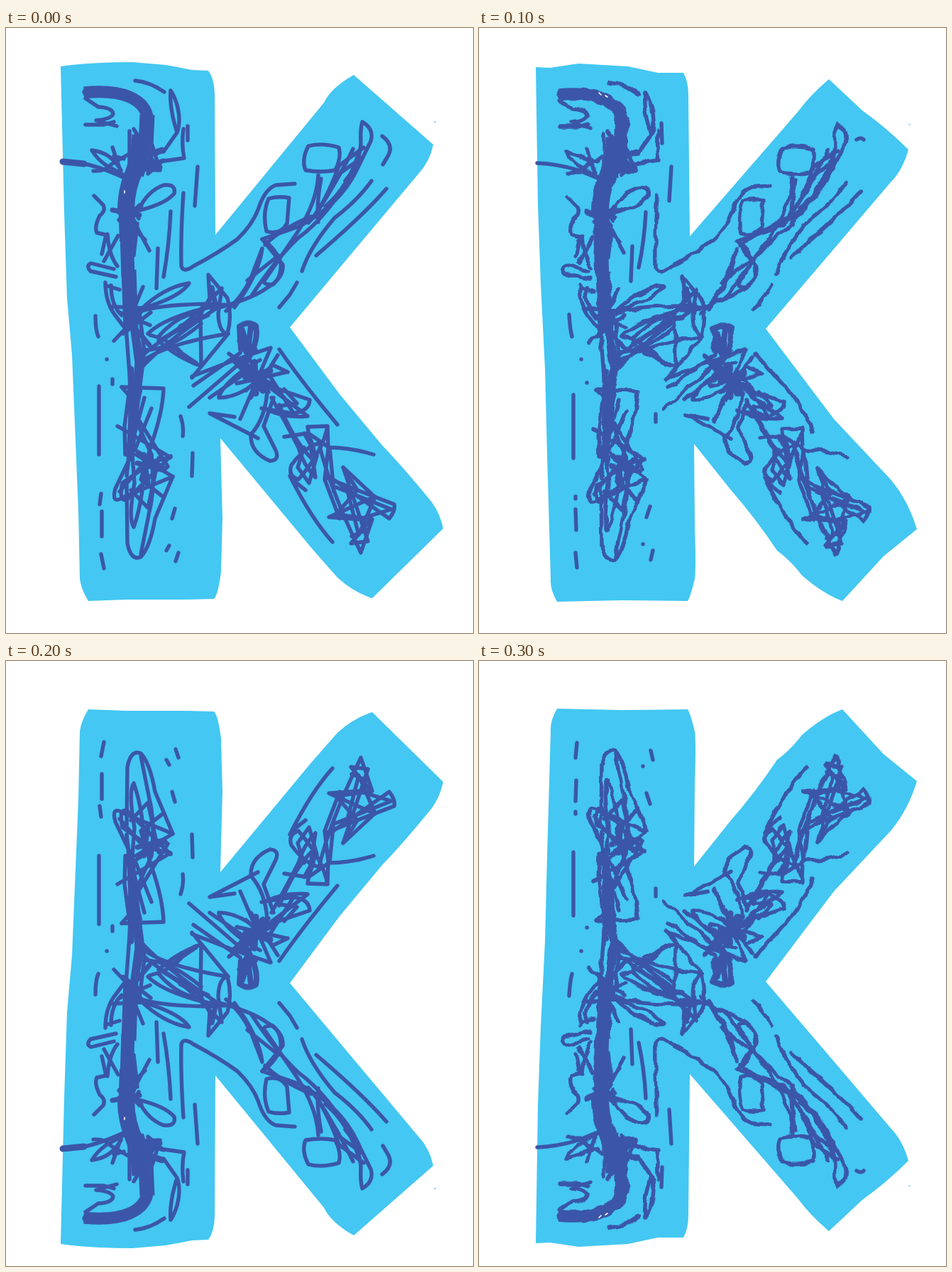
An HTML page without scripts for the animation above (0.4 s loop, 658 by 851 pixels).

```html
<!DOCTYPE html>
<html lang="en">
<head>
<meta charset="utf-8">
<title>Scribbled K</title>
<style>
  html, body { margin: 0; width: 100%; height: 100%; overflow: hidden; background: #fff; }
  svg { display: block; width: 658px; height: 851px; animation: flip 400ms step-end infinite; }
  .body { fill: #44c7f2; }
  .ink { fill: none; stroke: #3b56a8; stroke-width: 5.4; stroke-linecap: round; stroke-linejoin: round; }
  .smooth { animation: blink 200ms step-end infinite; }
  .rough { visibility: hidden; animation: blink 200ms step-end -100ms infinite; }
  .speck { stroke: #fff; stroke-width: 1.6; }
  /* the letter turns upside down every second pose */
  @keyframes flip { 50% { transform: translateY(23px) scaleY(-1); } }
  @keyframes blink { 0% { visibility: visible; } 50%, 100% { visibility: hidden; } }
</style>
</head>
<body>
<svg viewBox="0 0 658 851">
  <defs>
    <filter id="wobble" filterUnits="userSpaceOnUse" x="0" y="0" width="658" height="851" color-interpolation-filters="sRGB">
      <feTurbulence type="fractalNoise" baseFrequency=".07" numOctaves="1" seed="4"/>
      <feDisplacementMap in="SourceGraphic" scale="8" xChannelSelector="R" yChannelSelector="G"/>
    </filter>

    <g id="scribble">
      <!-- hook and trunk -->
      <g stroke-linecap="butt">
        <path stroke-width="17" d="M110 91Q150 87 174 97Q198 107 200 130L199 162"/>
        <path stroke-width="21" d="M199 122L197 165"/>
        <path stroke-width="27" d="M191 150Q190 180 181 205"/>
        <path stroke-width="24" d="M184 195Q168 225 169 262"/>
        <path stroke-width="22" d="M169 240L171 300"/>
        <path stroke-width="19" d="M170 290L172 350"/>
        <path stroke-width="21" d="M173 340L176 425"/>
      </g>
      <path d="M113 85L110 90L114 98M174 145V200M180 142L215 200L180 198L222 186L200 205L206 165L217 200"/>
      <path stroke-width="9" d="M186 185L216 196M196 180L220 172M178 200L205 192"/>
      <path d="M176 410L184 470L182 520L170 630M188 400L195 455L186 525L178 600M169 420L175 500L167 560L168 600M163 505L176 520L172 615"/>
      <path stroke-width="9" d="M182 425L188 455L184 510M176 480L177 560"/>

      <!-- top of the stem -->
      <path d="M112 99L130 111Q150 112 151 121Q148 128 127 130L156 138M112 136H138L152 132"/>
      <path d="M182 74Q203 76 223 90"/>
      <path d="M232 88Q230 112 241 147Q247 132 241 108Q237 95 232 88M241 147L222 174M250 142Q247 163 251 183L216 188"/>
      <path d="M121 172Q128 184 141 193L168 208M121 172Q148 175 162 200M150 168L162 203M123 201Q140 202 148 192L172 178M152 180L166 184"/>
      <path d="M184 262Q197 230 222 221Q240 219 237 233Q223 249 181 258L187 268"/>
      <path stroke-width="7" d="M150 256L188 263M160 270L190 250M172 275L188 250"/>

      <!-- left twigs -->
      <path d="M124 236L137 249Q141 257 132 264Q124 280 128 288L141 291L135 318M143 290Q145 320 157 335M138 328L158 292"/>
      <path d="M155 350L119 342Q112 334 120 331L152 339M140 358Q140 385 153 403L166 420M148 362Q148 390 163 404M140 362L160 368"/>
      <path d="M178 265L187 285L202 313M178 280L196 298M185 275L180 320"/>
      <path d="M150 392L196 394M152 440L190 400M165 430L204 400M193 364L170 420M160 400L203 418"/>

      <!-- knot between stem and arms -->
      <path d="M190 396Q222 365 258 359Q247 377 200 392L176 402M180 402Q210 388 300 388M200 430Q225 405 300 390"/>
      <path d="M215 434Q245 400 275 401L287 380L285 347L312 380Q319 405 312 430Q300 428 299 402L304 366L268 402"/>
      <path d="M186 466Q225 430 285 404M188 472Q220 445 313 430M196 453Q232 452 275 416M182 488Q215 447 300 392"/>
      <path d="M203 432Q235 440 250 460Q262 474 275 474L274 404M232 447L268 471M222 436Q250 420 266 403M215 440Q240 462 262 470M262 492L313 430"/>
      <path stroke-width="7" d="M246 420L276 405M278 392L308 390M290 365L296 392M180 420L202 446"/>

      <!-- upper arm -->
      <path d="M247 335Q250 345 264 335Q300 316 326 297Q350 274 357 250Q366 226 380 221L407 219M250 232Q246 290 247 335"/>
      <path d="M290 396Q345 382 367 366Q392 352 390 333L361 297Q385 289 413 279Q470 249 494 200L514 159Q519 142 502 132Q499 142 500 163Q497 198 468 236Q440 275 412 295Q380 325 345 378"/>
      <path d="M310 398Q332 380 345 352L361 310Q357 345 322 393M340 355L384 320M361 297Q380 310 387 330Q389 350 376 361Q364 361 363 357L402 300Q438 250 440 207"/>
      <path d="M444 212Q437 250 440 273M470 191Q449 250 426 274M489 170Q471 208 436 263M498 172Q484 222 450 251M365 305Q385 284 430 265M478 215L500 186"/>
      <path d="M426 166Q445 161 469 168Q473 182 464 200Q444 204 422 200Q416 185 426 166ZM466 196L504 168M464 209L502 182"/>
      <path d="M370 240Q384 236 399 239L396 275Q386 292 367 286Q361 260 370 240Z"/>
      <path d="M515 215Q496 242 463 267Q428 308 417 342M536 226Q505 262 437 320M410 358L400 375L385 393"/>

      <!-- lower arm -->
      <path stroke-width="8" d="M331 452L329 420Q341 411 352 419Q356 438 343 462L333 425M345 420L338 475"/>
      <path stroke-width="9" d="M325 470L362 510M338 492L372 482M350 470L352 514M338 484L374 502"/>
      <path d="M258 533L300 497L352 452M264 503L330 457M262 490L325 466L372 450M287 520L345 480M300 518Q312 492 358 467M300 520Q333 520 367 485"/>
      <path d="M373 450L330 550M383 460L345 520M328 440L370 512M314 458L382 510M395 484L325 500M397 484L376 474L338 510M318 467L392 520"/>
      <path d="M360 500L428 523Q427 540 403 542L360 535M375 508L425 546Q395 549 368 537M372 490L404 540M392 508L410 528L384 532"/>
      <path d="M368 510Q366 548 345 572Q344 597 372 609Q386 608 380 594L363 560L377 520"/>
      <path d="M374 520Q397 560 412 590Q419 615 436 632L425 561L453 560Q447 595 412 635Q397 630 402 615Q420 590 441 584"/>
      <path d="M385 530Q405 580 430 605Q440 600 425 570L392 575M420 590L411 618L427 640L438 602L420 570M426 570L455 590Q485 590 518 600M400 630Q430 690 460 723M404 636L422 650"/>
      <path d="M453 562L454 592L449 635L470 690M441 584Q455 645 500 738L516 691L465 684L495 650L475 618L510 722L486 725L515 690"/>
      <path d="M450 632L495 650L547 670Q549 679 540 690L454 630M465 646L543 677L497 691L455 688L520 659M475 618L520 660L497 713L482 655M456 590L462 652M487 715L510 705"/>

      <!-- foot of the stem -->
      <path d="M163 505L222 507Q221 540 205 585L190 635L222 660M190 507L170 600M195 520L176 590L225 620M157 560L232 604L196 612M205 535L183 590M180 540L228 617"/>
      <path d="M180 545L205 600L160 652M170 640L171 725Q176 750 190 744Q203 730 210 690L235 631L165 660Q148 671 154 648L177 600M232 602L172 662Q158 670 164 640L200 615"/>
      <path d="M205 600Q210 650 202 680L190 740M195 600Q195 660 180 702Q172 690 181 640L178 600M215 605L200 675L176 650M183 600L235 631"/>
      <path stroke-width="7" d="M185 612L222 622M194 600L200 640"/>
    </g>
  </defs>

  <g class="smooth">
    <path class="body" d="M77 54L92 52Q130 48 178 48L225 52L262 59L285 60Q293 70 294 92L295 291L420 139L448 105Q458 84 490 66L602 164Q597 188 582 204L400 421L470 515L530 587Q560 618 600 667Q612 684 616 704L516 802Q490 794 467 773L430 731L302 577L305 690L303 765Q299 797 293 803L250 804H170L116 806Q106 790 104 775L102 680L93 460L86 380L82 260Z"/>
    <circle class="body" cx="604.5" cy="132" r="1"/>
    <g class="ink">
      <use href="#scribble"/>
      <path stroke-width="9" d="M80 188L110 191"/>
      <path d="M105 190Q130 194 165 210M256 138V158M530 152Q548 165 537 182L531 192"/>
      <path d="M270 195L266 250M232 258Q230 305 222 350M214 310L212 366"/>
      <path d="M385 452Q420 502 467 558M322 547L287 542L355 577"/>
      <path d="M126 405Q126 425 130 434M142 466h.1M150 494v7M131 504V600M134 655L132 670M135 680V715M134 740L138 760"/>
      <path d="M246 546Q251 560 249 574M263 598L262 630M238 676L234 690M230 728L226 735M243 738L239 750"/>
      <path class="speck" d="M167 229v3"/>
    </g>
  </g>

  <g class="rough">
    <path class="body" d="M80 55L100 56L140 50L210 54L252 63L288 63Q295 75 295 95L297 293L450 117Q465 96 493 72L540 116Q575 141 605 171Q597 200 580 217L505 305L404 423L500 550L580 635Q605 665 617 705L570 743L512 806Q485 796 455 770Q440 750 420 735Q390 690 355 650L303 585L304 700Q306 760 304 775Q298 800 294 806L200 805L110 807Q100 790 101 775L96 600L93 480L87 360L83 250Z"/>
    <path class="body" d="M604 134l4 2-1 1z"/>
    <g class="ink">
      <g filter="url(#wobble)">
        <use href="#scribble" x="2" y="3"/>
        <path d="M389 459L405 475L440 515L467 555L470 568M324 550L290 544L355 577"/>
      </g>
      <path d="M82 190Q110 191 140 200L167 211M257 134L258 162M532 157Q538 153 542 157"/>
      <path d="M271 195L268 243M235 259Q233 300 225 337M216 307L214 356"/>
      <path d="M127 403Q128 422 131 434M144 466h.1M152 499h.1M133 516V605M136 659v3M136 677L137 706M136 738L138 759"/>
      <path d="M249 543V554M241 673L236 688M231 726h.1M245 735L242 748"/>
      <path class="speck" d="M169 91l3 3M178 95l3 2"/>
    </g>
  </g>
</svg>
</body>
</html>
```
